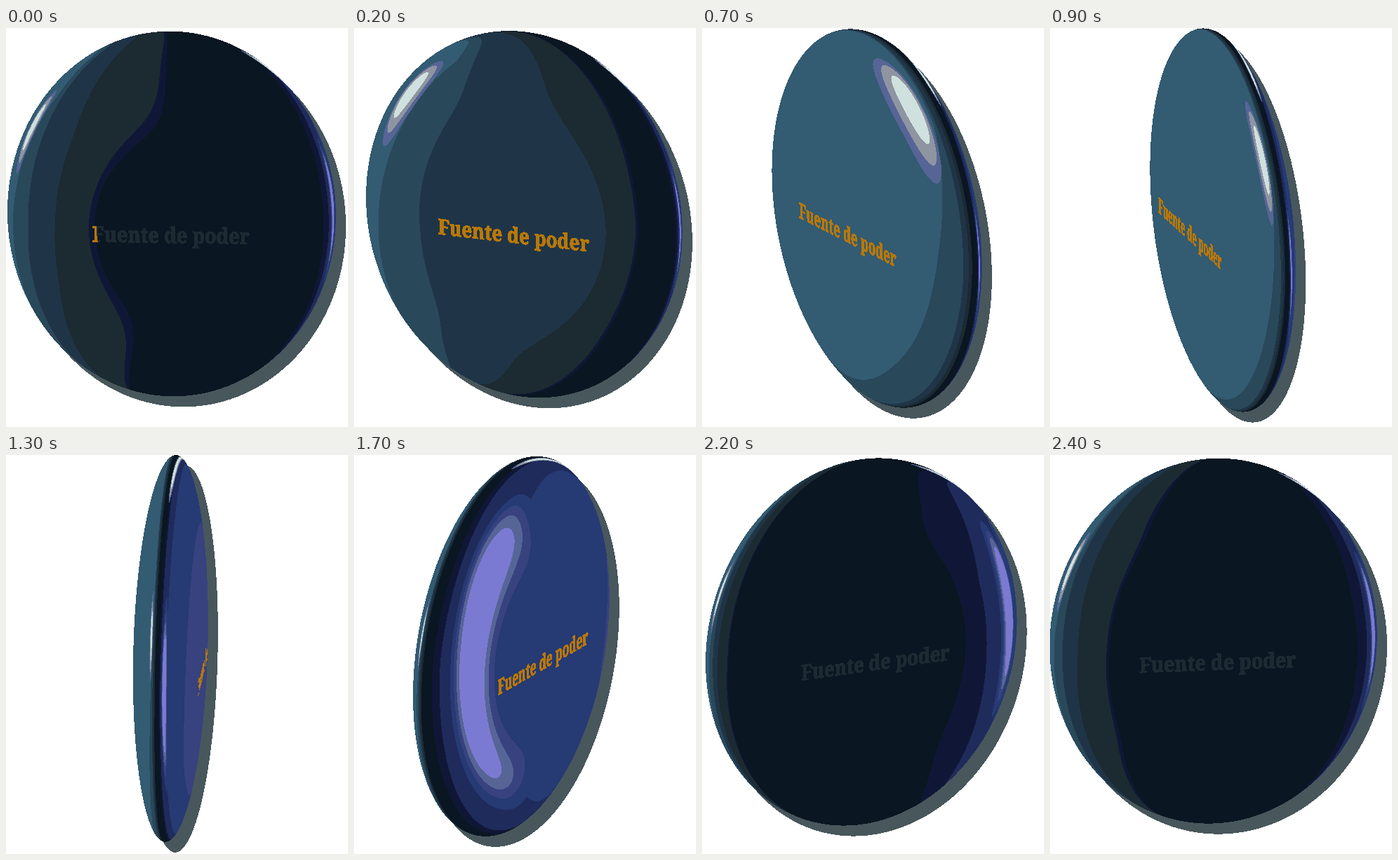
Recreate the animation shown at these times as an HTML page with a canvas. Size 487x568 px, loop 2500 ms.

```html
<!DOCTYPE html>
<html lang="es">
<head>
<meta charset="utf-8">
<title>Fuente de poder</title>
<style>
html, body { margin: 0; width: 100%; height: 100%; overflow: hidden; background: #fff; }
canvas { display: block; width: 487px; height: 568px; }
</style>
</head>
<body>
<canvas id="stage" width="487" height="568"></canvas>
<script>
const W = 487, H = 568, STEPS = 25, STEP_MS = 100;
const R = 275.5, T = 57;              // lens radius and half thickness
const SQUEEZE = 0.85;                 // horizontal squeeze of the view
const SIN_P = 0.34, COS_P = 0.94;     // camera looks slightly down
const SHADOW = { x: 14, y: 15 };

const rgb = hex => [1, 3, 5].map(i => parseInt(hex.slice(i, i + 2), 16));
const C = {
  paper: rgb('#ffffff'), shadow: rgb('#48575c'), gold: rgb('#b87809'),
  teal4: rgb('#335b72'), teal3: rgb('#29485a'), teal2: rgb('#1f3547'), teal1: rgb('#1c2a32'),
  night: rgb('#0a1621'), navy1: rgb('#101736'), navy2: rgb('#1f2b5b'), navy3: rgb('#263a74'),
  violet1: rgb('#37427f'), violet2: rgb('#566596'), violet3: rgb('#7b7ad2'),
  grey: rgb('#8f95a0'), white: rgb('#cfe1de')
};

const stage = document.getElementById('stage').getContext('2d');
const layer = document.createElement('canvas');
layer.width = W;
layer.height = H;
const ink = layer.getContext('2d', { willReadFrequently: true });

const smooth = (a, b, v) => {
  const t = Math.min(1, Math.max(0, (v - a) / (b - a)));
  return t * t * (3 - 2 * t);
};

// Pose of the lens: visible side's angle, normal and centre
function poseAt(step) {
  const turn = step * Math.PI / STEPS, sway = Math.sin(2 * turn);
  let a = turn + (2 - 0.6 * sway) * Math.PI / 180;
  if (a > Math.PI / 2) a -= Math.PI;
  const s = Math.sin(a), c = Math.cos(a);
  return {
    s, c,
    nx: -s, ny: SIN_P * c, nz: COS_P * c,
    cx: 236 + 13.4 * sway,
    cy: 270 - 5.5 * Math.cos(2 * turn)
  };
}

function textMask(p) {
  const text = 'Fuente de poder';
  ink.setTransform(1, 0, 0, 1, 0, 0);
  ink.clearRect(0, 0, W, H);
  ink.font = 'bold 32px "Noto Serif", "Liberation Serif", serif';
  ink.textAlign = 'center';
  ink.lineJoin = 'round';
  ink.lineWidth = 1.1;
  ink.setTransform(SQUEEZE * p.c, SIN_P * p.s, 0, COS_P,
    p.cx + 1 - p.s * (SQUEEZE * T + 10 * p.c), p.cy + T * p.ny + 22);
  ink.fillText(text, 0, 0);
  ink.strokeText(text, 0, 0);
  return ink.getImageData(0, 0, W, H).data;
}

const spot = (x, y, cx, cy, rx, ry) => Math.hypot((x - cx) / rx, (y - cy) / ry);

// Banded light, looked up by surface direction
function shade(x, y) {
  const lamp = Math.min(
    spot(x, y, -0.6, -0.07, 0.065, 0.11),
    spot(x, y, 0.58, -0.74, 0.1, 0.07));
  if (lamp < 1) return C.white;
  if (lamp < 1.45) return C.grey;
  if (lamp < 1.8) return C.violet2;

  const glow = spot(x, y, 0.74, 0.17, x < 0.74 ? 0.073 : 0.055, 0.19);
  if (glow < 1) return C.violet3;
  if (glow < 1.2) return C.violet2;
  if (glow < 1.38) return C.violet1;
  if (glow < 1.65) return C.navy3;

  const left = x + 0.3 * Math.max(0, y - 0.33);
  if (left < -0.375) return x + 0.5 * Math.max(y, -0.1) < -0.485 ? C.teal4 : C.teal3;
  if (left < -0.216) return C.teal2;
  if (left < -0.057) return C.teal1;
  if (left < -0.044) return C.navy1;

  const right = x - 0.12 * Math.abs(y - 0.2);
  if (right < 0.41) return C.night;
  if (right < 0.53) return C.navy1;
  if (right < 0.76) return C.navy2;
  return right < 0.955 ? C.navy3 : C.violet1;
}

function letterColor(x) {
  if (x < -0.044 || x > 0.65) return C.gold;
  return x > 0.565 ? C.shadow : C.teal1;
}

function render(step) {
  const p = poseAt(step), { nx, ny, nz } = p;
  const mask = textMask(p);
  const image = stage.createImageData(W, H);
  const out = image.data;
  const flat = 1 / (R * R), K = 1 / (T * T) - flat;
  const A = flat + K * nz * nz;

  const solve = (px, py) => {
    const X = (px + 0.5 - p.cx) / SQUEEZE, Y = py + 0.5 - p.cy;
    const d = nx * X + ny * Y, B = K * nz * d;
    const disc = B * B - A * ((X * X + Y * Y) * flat + K * d * d - 1);
    return { X, Y, d, disc, Z: disc < 0 ? 0 : (Math.sqrt(disc) - B) / A };
  };

  for (let py = 0, i = 0; py < H; py++) {
    for (let px = 0; px < W; px++, i += 4) {
      const hit = solve(px, py);
      let color = C.paper;
      if (hit.disc >= 0) {
        const q = hit.d + nz * hit.Z;
        const rx = hit.X - q * nx, ry = hit.Y - q * ny, rz = hit.Z - q * nz;
        const r = Math.hypot(rx, ry, rz) / R;
        // the middle of each face is level, the rest is domed
        const g = smooth(0.38, 0.78, r) * flat, k = q / (T * T);
        const vx = rx * g + nx * k, vy = ry * g + ny * k, vz = rz * g + nz * k;
        const len = Math.hypot(vx, vy, vz) || 1;
        color = mask[i + 3] > 110 ? letterColor(vx / len) : shade(vx / len, vy / len);
      } else if (solve(px - SHADOW.x, py - SHADOW.y).disc >= 0) {
        color = C.shadow;
      }
      out[i] = color[0];
      out[i + 1] = color[1];
      out[i + 2] = color[2];
      out[i + 3] = 255;
    }
  }
  return image;
}

const cache = [];
let shown = -1;

function tick() {
  const step = Math.floor(performance.now() / STEP_MS) % STEPS;
  if (step !== shown) {
    cache[step] = cache[step] || render(step);
    stage.putImageData(cache[step], 0, 0);
    shown = step;
  }
  requestAnimationFrame(tick);
}
tick();
</script>
</body>
</html>
```
